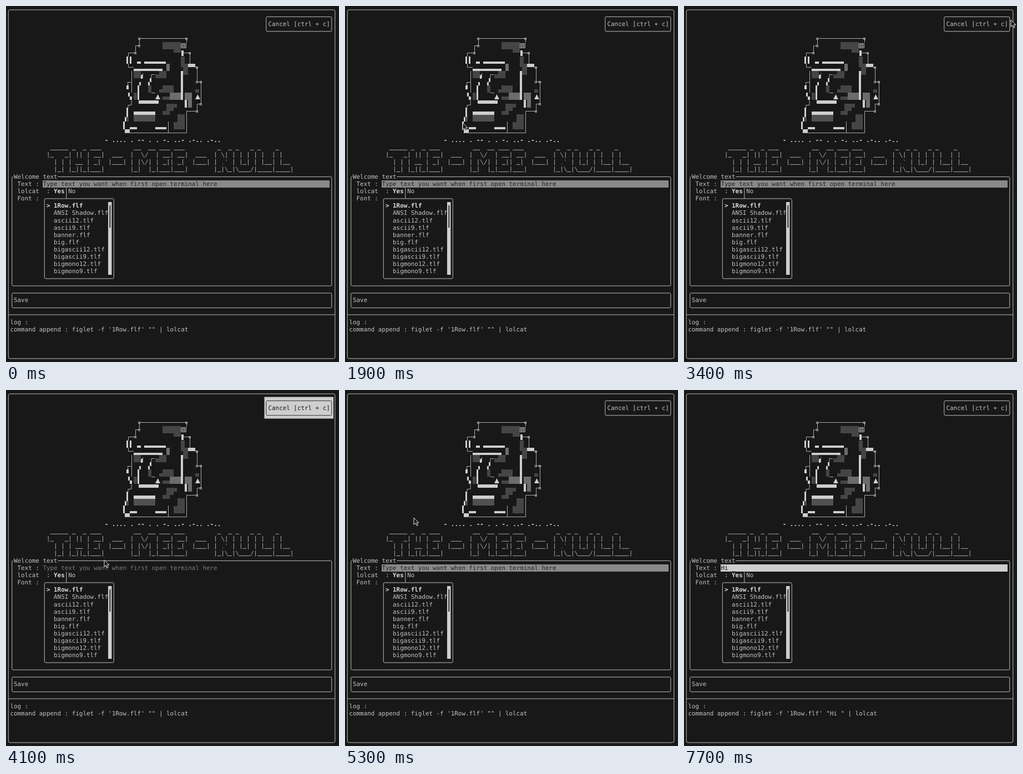
Animation, 600 px wide and 641 px high, one loop 8000 ms. Source, as an HTML page:

```html
<!DOCTYPE html>
<html lang="en">
<head>
<meta charset="utf-8">
<title>Welcome text</title>
<style>
html, body { margin: 0; width: 100%; height: 100%; overflow: hidden; background: #181818; }
svg { display: block; }
text {
  font: 10.88px "DejaVu Sans Mono", "Liberation Mono", monospace;
  fill: #c2c2c2; white-space: pre; text-rendering: geometricPrecision;
}
.bold { font-weight: bold; fill: #dcdcdc; }
.box { fill: none; stroke: #bcbcbc; }
.thin { fill: none; stroke: #a8a8a8; }
.ink { fill: #181818; }

.bar, .hint, .glow, .cancel, .cancelBox, .s0, .s1, .s2, .s3 {
  animation: 8s -5ms step-end infinite;
}
.bar { animation-name: bar; }
.hint { animation-name: hint; }
.glow { animation-name: glow; }
.cancel { animation-name: cancel; }
.cancelBox { animation-name: cancelBox; }
.s0 { animation-name: s0; }
.s1 { animation-name: s1; }
.s2 { animation-name: s2; }
.s3 { animation-name: s3; }
.mouse { animation: move 8s -5ms infinite, seen 8s -5ms step-end infinite; }

@keyframes bar {
  0%, 53.75% { fill: #898989; }
  43.75% { fill: #181818; }
  85%, 100% { fill: #cecece; }
}
@keyframes hint {
  0%, 53.75% { fill: #262626; }
  43.75% { fill: #7c7c7c; }
}
@keyframes glow { 0%, 53.75% { opacity: 0; } 43.75% { opacity: 1; } }
@keyframes cancel { 0%, 53.75% { fill: #c2c2c2; } 43.75% { fill: #181818; } }
@keyframes cancelBox { 0%, 53.75% { stroke: #bcbcbc; } 43.75% { stroke: #303030; } }
@keyframes s0 { 0% { opacity: 1; } 85%, 100% { opacity: 0; } }
@keyframes s1 { 0%, 91.25%, 100% { opacity: 0; } 85% { opacity: 1; } }
@keyframes s2 { 0%, 96.25%, 100% { opacity: 0; } 91.25% { opacity: 1; } }
@keyframes s3 { 0% { opacity: 0; } 96.25%, 100% { opacity: 1; } }
@keyframes seen { 0%, 85%, 100% { opacity: 0; } 8.75% { opacity: 1; } }
@keyframes move {
  0% { transform: translate(502px, 288px); animation-timing-function: step-end; }
  8.75% { transform: translate(502px, 288px); animation-timing-function: steps(4); }
  13.75% { transform: translate(268px, 322px); animation-timing-function: step-end; }
  17.5% { transform: translate(268px, 322px); animation-timing-function: steps(5); }
  23.75% { transform: translate(212px, 210.5px); animation-timing-function: steps(4); }
  28.75% { transform: translate(187px, 225px); animation-timing-function: steps(4); }
  33.75% { transform: translate(141px, 339px); animation-timing-function: steps(5); }
  40% { transform: translate(500px, 160px); animation-timing-function: steps(2); }
  42.5% { transform: translate(589px, 25px); animation-timing-function: steps(2); }
  45% { transform: translate(530px, 34px); animation-timing-function: steps(4); }
  50% { transform: translate(185px, 337px); animation-timing-function: step-end; }
  51.25% { transform: translate(177px, 306px); animation-timing-function: step-end; }
  52.5% { transform: translate(35px, 570px); animation-timing-function: step-end; }
  53.75% { transform: translate(155px, 322px); animation-timing-function: step-end; }
  55% { transform: translate(155px, 322px); animation-timing-function: steps(2); }
  57.5% { transform: translate(156px, 322px); animation-timing-function: step-end; }
  61.25% { transform: translate(156px, 322px); animation-timing-function: steps(4); }
  66.25%, 100% { transform: translate(124px, 230px); animation-timing-function: step-end; }
}
</style>
</head>
<body>
<svg width="600" height="641" viewBox="0 0 600 641">
  <!-- frames -->
  <rect class="glow" x="465.5" y="12.5" width="124.5" height="39" fill="#cecece"/>
  <g transform="translate(.3 .4)">
    <rect class="box" x="4" y="6.5" width="588.5" height="628" rx="3"/>
    <path class="box" d="M4 555.5H592.5M13 307H12.5q-2 0-2 2V501.5q0 2 2 2H584.5q2 0 2-2V309q0-2-2-2H93"/>
    <rect class="box" x="10.5" y="516.5" width="576" height="26.5" rx="2"/>
    <rect class="box cancelBox" x="468.5" y="19" width="118" height="26.300" rx="2"/>
    <rect class="box" x="69" y="346.500" width="125" height="144" rx="2"/>
    <path class="box" d="M108.500 327V346"/>
  </g>
  <rect x="184" y="353" width="6.5" height="131" fill="#cecece"/>
  <rect x="186.5" y="359" width="1.7" height="40" fill="#181818"/>
  <rect class="bar" x="66" y="314" width="517" height="13"/>

  <!-- stone head -->
  <path fill="#454545" d="M282 65h33v13h-33zM302 78h13v6h-13zM315 91h7v13h-7zM315 104h13v6h-13zM319 110h9v14h-9zM230 117h13v13h-13zM276 117h13v13h-20v-7h7zM256 143h6v13h-6zM282 143h20v13h-20zM276 150h6v6h-6zM230 156h6v13h-6zM341 150h7v6h-7zM282 163h13v6h-13zM289 176h19v7h-6v6h-7v7h-13v-7h7zM309 195h13v27h-20v-13h7z"/>
  <path fill="#6c6c6c" d="M289 104h6v13h-6zM295 156h20v13h-20zM322 156h13v13h-13zM328 169h7v14h-7z"/>
  <path fill="#505050" d="M230 196h39v12h-39z"/>
  <path class="thin" d="M240.500 71V58.500H325.500V66M240.500 71.500H233.500V84.500H220.500V91M320 84.500H331.500V104M341 110.500H344.500V136.500H351.500V176.500H344.500V189.500H325.500V228.500H214M220.500 104V110.500H230M226.500 117V156M219.500 143V137.500H226M246.500 130V121M262 130V123.500H268M226 170V178.500H220V183M292.500 208V228M219.500 200V208M262 156.500H269"/>
  <path id="corners" class="thin"/>
  <path fill="#cecece" d="M217 91h3v13h-3zM223 91h3v13h-3zM236 100h7v4h-7zM249 100h39v4h-39zM230 113h52v4h-52zM316 80h4v10h-4zM328 104h13v6h-13zM315 117h4v52h-4zM322 169h4v14h-4zM239 170h36v6h-36zM230 190h39v6h-39zM223 218h13v4h-13zM269 218h20v4h-20zM217 143h4v7h-4zM220 156h3v7h-3zM223 163h4v6h-4zM237 143h3v26h-3zM240 137h3v6h-3zM243 124h3v7h-3zM259 130h3v7h-3zM256 137h3v6h-3zM217 183h3v17h-3zM214 200h3v8h-3zM211 208h3v14h-3zM214 222h9v6h-9zM269 168l4.500-9 4.500 9zM341 168l4.500-9 4.500 9z"/>
  <path class="thin" d="M315.500 67.500h9v8h-9zM315.500 70h9M315.500 73h9M318.500 67v9M321.500 67v9"/>

  <path id="banner" class="thin"/>
  <g id="words"></g>
  <path class="mouse" d="M0 0V12.500L3 9.700L5.300 14.300L7.300 13.300L5 8.900H9z" fill="#181818" stroke="#e4e4e4" stroke-linejoin="round"/>
</svg>
<script>
const CW = 6.55, RH = 13.08;
const colX = c => 0.9 + c * CW;
const midY = r => 6.5 + r * RH;
const words = document.getElementById('words');

function put(col, row, str, cls = '') {
  const t = document.createElementNS('http://www.w3.org/2000/svg', 'text');
  t.setAttribute('x', colX(col));
  t.setAttribute('y', midY(row) + 3.7);
  t.setAttribute('class', cls);
  t.textContent = str;
  words.append(t);
}

put(72, 2, 'Cancel [ctrl + c]', 'cancel');
put(27, 17.93, '- .... . -- . . -. ..- .-.. .-..', 'bold');
put(2, 23, 'Welcome text');
put(3, 24, 'Text :');
put(3, 25, 'lolcat  :');
put(13, 25, 'Yes', 'bold');
put(17, 25, 'No');
put(3, 26, 'Font :');
put(11, 27, '>', 'bold');
['1Row.flf', 'ANSI Shadow.flf', 'ascii12.tlf', 'ascii9.tlf', 'banner.flf', 'big.flf',
  'bigascii12.tlf', 'bigascii9.tlf', 'bigmono12.tlf', 'bigmono9.tlf'
].forEach((name, i) => put(13, 27 + i, name, i ? '' : 'bold'));
put(2, 40, 'Save');
put(1, 43, 'log :');

// typing states
words.insertAdjacentHTML('beforeend', '<g class="s0"></g>');
put(10, 24, 'Type text you want when first open terminal here', 'hint');
words.querySelector('.s0').append(words.lastChild);
['', 'H', 'Hi', 'Hi '].forEach((typed, i) => {
  put(1, 44, `command append : figlet -f '1Row.flf' "${typed}" | lolcat`, 's' + i);
  if (i) put(10, 24, typed + '_', 'ink s' + i);
});

// small squares on the corners of the head
const corners = [[240, 58], [325, 58], [240, 71], [233, 84], [331, 84], [344, 110],
  [344, 136], [351, 136], [351, 176], [344, 189]];
document.getElementById('corners').setAttribute('d',
  corners.map(([x, y]) => `M${x - 1.5} ${y - .5}h3v3h-3z`).join(''));

// banner lettering, one stroke per character
const banner = [
  ' _____ _  _ ___         __  __ ___ ___         _  _ _   _ _    _',
  '|_   _| || | __|  ___  |  \\/  | __| __|  ___  | \\| | | | | |  | |',
  '  | | | __ | _|  |___| | |\\/| | _|| _|  |___| | .` | |_| | |__| |__',
  '  |_| |_||_|___|       |_|  |_|___|___|       |_|\\_|\\___/|____|____|'
];
const strokes = {
  '_': 'm0 4.2h6.55',
  '|': 'm3.3 -5.2v10.6',
  '/': 'm.8 4.6l5 -9.2',
  '\\': 'm.8 -4.6l5 9.2',
  '.': 'm2.6 3.2h1.4',
  '`': 'm2.2 -4.5l1.6 2'
};
let d = '';
banner.forEach((line, r) => [...line].forEach((ch, c) => {
  if (strokes[ch]) d += `M${colX(11 + c)} ${midY(19 + r)}${strokes[ch]}`;
}));
document.getElementById('banner').setAttribute('d', d);
</script>
</body>
</html>
```
